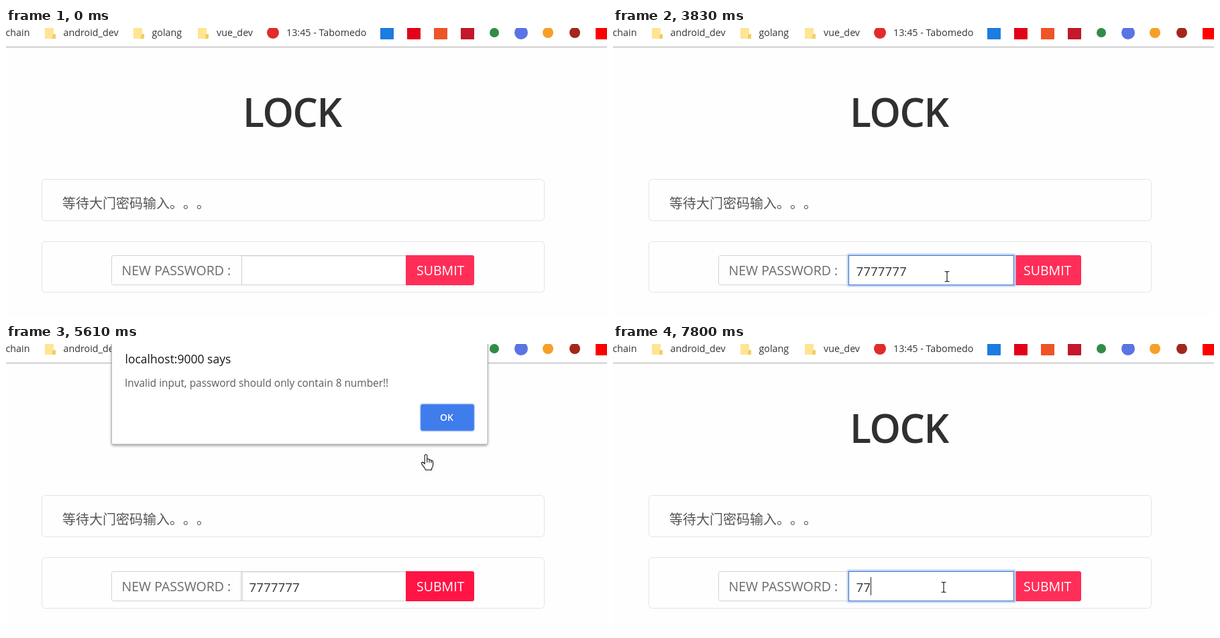
An HTML page that plays this animation: 896 px wide and 431 px high, repeating every 8 s.

```html
<!DOCTYPE html>
<html lang="zh">
<head>
<meta charset="utf-8">
<title>Lock</title>
<style>
html, body { margin: 0; width: 100%; height: 100%; overflow: hidden; background: #fefefe; }
svg { display: block; width: 896px; height: 431px; font-family: "Open Sans", "Noto Sans", sans-serif; }
.bar { font-size: 14.3px; fill: #333; }
.label { font-size: 19.5px; }
.han {
  font: 300 20px "Noto Sans CJK SC", "Noto Sans CJK", sans-serif; fill: #555;
  font-kerning: none; text-spacing-trim: space-all; font-feature-settings: "chws" 0, "halt" 0;
}
.panel { fill: none; stroke: #e4e4e4; }
</style>
</head>
<body>
<svg viewBox="0 0 896 431">
  <defs>
    <filter id="soft" x="-10%" y="-20%" width="120%" height="140%"><feGaussianBlur stdDeviation="2"/></filter>
  </defs>
  <rect width="896" height="431" fill="#fefefe"/>

  <g class="bar">
    <rect width="896" height="28" fill="#fff"/>
    <path d="M0 28.5H896" stroke="#ababab"/>
    <text x="-.5" y="12">chain</text>
    <text x="85.5" y="12">android_dev</text>
    <text x="217.5" y="12">golang</text>
    <text x="314" y="12">vue_dev</text>
    <text x="418" y="12">13:45 - Tabomedo</text>
    <g id="icons"></g>
  </g>

  <text x="353" y="148" font-size="59" font-weight="600" letter-spacing="-1.4" fill="#303030">LOCK</text>
  <rect class="panel" x="53.5" y="226.5" width="749" height="62" rx="5"/>
  <text class="han" x="84" y="270">等待大门密码输入。。。</text>
  <rect class="panel" x="53.5" y="319.5" width="749" height="76" rx="5"/>

  <path d="M351.5 340.5H160.5Q157.5 340.5 157.5 343.5V381.5Q157.5 384.5 160.5 384.5H351.5" fill="#fefefe" stroke="#d2d2d2"/>
  <text class="label" x="172.5" y="370" fill="#6a6a6a">NEW PASSWORD :</text>
  <rect x="351.5" y="340.5" width="246" height="44" fill="#fff" stroke="#cfcfcf"/>
  <path d="M352 341.5H597" stroke="#ececec"/>
  <path id="edge" d="M349.5 341V384M352.5 341V384" stroke="#e6e6e6"/>
  <rect id="ring" x="595" y="339" width="104" height="47" rx="4" fill="none" stroke="#ffb8c6" stroke-width="3"/>
  <path id="button" d="M596 340H695Q698 340 698 343V382Q698 385 695 385H596Z"/>
  <text class="label" x="612" y="370" fill="#fff">SUBMIT</text>
  <g id="focus" fill="none">
    <rect x="350" y="339" width="249" height="47" rx="1" stroke="#c3d5f3" stroke-width="3"/>
    <rect x="351.5" y="340.5" width="246" height="44" fill="#fff" stroke="#3a70d0"/>
  </g>
  <text id="digits" x="362.5" y="371" font-size="18.8" fill="#333"></text>
  <path id="caret" d="M0 349V376" stroke="#222"/>

  <g id="dialog">
    <rect class="sheet" y="-18" height="170" rx="3" opacity=".42" filter="url(#soft)"/>
    <rect class="sheet" y="-20" height="170" rx="2" fill="#fff" stroke="#b4b4b4"/>
    <text x="177.5" y="29" font-size="17.5" fill="#161616">localhost:9000 says</text>
    <text x="177" y="64" font-size="15.4" fill="#5c5c5c">Invalid input, password should only contain 8 number!!</text>
    <rect x="617.5" y="89.5" width="81" height="41" rx="4" fill="#3f7cec" stroke="#bcd1f8" stroke-width="1.5"/>
    <text x="657" y="115" font-size="14" font-weight="600" fill="#fff" text-anchor="middle">OK</text>
  </g>

  <g id="pointer" stroke-linejoin="round">
    <circle id="press" r="15" fill="#ffd21e" opacity=".65"/>
    <path id="arrow" d="M0 0V16L3.6 12.6 6.2 18.6 8.6 17.6 6 11.8H11Z" fill="#fff" stroke="#111"/>
    <path id="hand" d="M-1.8 14V1.6Q-1.8 0 0 0T1.8 1.6V7Q4.6 5.6 5 8Q7.6 7 8 9.2Q10.6 8.6 10.6 11V16Q10.6 19 8.6 20.5V23H-.6Q-1 20.6 -5.5 15.4Q-7.6 11.6 -5 11.4Q-3.4 11.6 -1.8 14ZM1.8 7V12M5 8V12M8 9.2V12.5" fill="#fff" stroke="#111" stroke-width="1.1"/>
    <path id="beam" d="M-3.5 -7.5H-1L0 -6.5 1 -7.5H3.5M0 -6.5V6.5M-3.5 7.5H-1L0 6.5 1 7.5H3.5" fill="none" stroke="#222" stroke-width="1.2"/>
  </g>
</svg>

<script>
const LOOP = 8000;
const $ = id => document.getElementById(id);
const show = (id, on) => $(id).setAttribute('visibility', on ? 'inherit' : 'hidden');
const during = (t, from, to) => t >= from && t < to;

const folder = x => `<path d="M${x} 0H${x + 13}V9H${x + 16}V16H${x}Z" fill="#ffe592"/>
  <path d="M${x + 13} 9H${x + 16}V16H${x + 11}V11Z" fill="#f3cd63"/>`;
const square = (x, color) => `<rect x="${x}" y="-3" width="20" height="20" rx="1" fill="${color}"/>`;
const dot = (x, r, color) => `<circle cx="${x}" cy="7" r="${r}" fill="${color}"/>`;
$('icons').innerHTML = [58, 190, 286].map(folder).join('') +
  dot(398, 9, '#e22b2b') +
  square(558, '#1c7ce0') + square(598, '#e30019') +
  square(638, '#ef5428') + square(678, '#c4182b') +
  dot(728, 7, '#2f8d46') + dot(768, 10, '#5a74e4') +
  dot(808, 8, '#f7a028') + dot(848, 8, '#a3271a') +
  square(879, '#f00');

// Pointer poses, each held until the next: time, x, y, shape
const poses = [
  [210, 504, 400, 'arrow'], [320, 501, 383, 'beam'], [430, 499, 375, 'beam'], [540, 498, 372, 'beam'],
  [4050, 508, 372, 'beam'], [4160, 553, 371, 'beam'], [4270, 618, 369, 'hand'], [4380, 645, 368.5, 'hand'],
  [4930, 643, 359, 'hand'], [5040, 637, 342, 'hand'], [5150, 628, 323, 'hand'],
  [5370, 626, 268, 'hand'], [5500, 626, 196, 'hand'], [5610, 626, 165.5, 'hand'],
  [5710, 640, 141, 'arrow'], [5820, 662, 122, 'arrow'], [5930, 672, 115, 'arrow'],
  [6270, 664, 138, 'arrow'], [6380, 618, 212, 'arrow'], [6490, 540, 310, 'arrow'], [6600, 495, 362, 'beam'],
  [6720, 493, 364, 'beam']
];
const presses = [760, 4490, 6040, 6720];
const typed = [1750, 1970, 2300, 2510, 2840, 3060, 3280];
const retyped = [7580, 7800];

function drawDialog(t) {
  const opening = t < 4710, closing = t >= 6150;
  const grow = opening || closing ? 1.5 : 0;
  show('dialog', during(t, 4600, 6270));
  $('dialog').setAttribute('opacity', opening ? .7 : closing ? .8 : 1);
  $('dialog').setAttribute('transform', `translate(0 ${grow ? -10 : 0})`);
  for (const sheet of document.querySelectorAll('.sheet')) {
    sheet.setAttribute('x', 157.5 - grow);
    sheet.setAttribute('width', 560.5 + 2 * grow);
  }
}

function drawField(t) {
  const focused = during(t, 760, 4490) || t >= 6720;
  const count = (t < 6150 ? typed : retyped).filter(k => k <= t).length;
  const blinkedOff = during(t, 1320, 1750) || during(t, 3830, 4490) || during(t, 7370, 7580);
  show('focus', focused);
  show('edge', during(t, 4490, 6720));
  show('ring', during(t, 6150, 6720));
  show('caret', focused && !blinkedOff);
  $('digits').textContent = '7'.repeat(count);
  $('caret').setAttribute('transform', `translate(${Math.floor(363 + 10.7 * count) + .5} 0)`);
  $('button').setAttribute('fill', during(t, 4270, 6150) ? '#ff1445' : '#ff2e58');
}

function drawPointer(t) {
  const pose = poses.findLast(p => p[0] <= t);
  show('pointer', !!pose);
  show('press', presses.some(p => during(t, p, p + 110)));
  if (!pose) return;
  const [, x, y, shape] = pose;
  $('pointer').setAttribute('transform', `translate(${x} ${y})`);
  for (const id of ['arrow', 'hand', 'beam']) $(id).setAttribute('display', id === shape ? 'inline' : 'none');
}

function draw(t) {
  drawField(t);
  drawDialog(t);
  drawPointer(t);
}

const start = performance.now();
function tick() {
  draw((performance.now() - start) % LOOP);
  requestAnimationFrame(tick);
}
tick();
</script>
</body>
</html>
```
